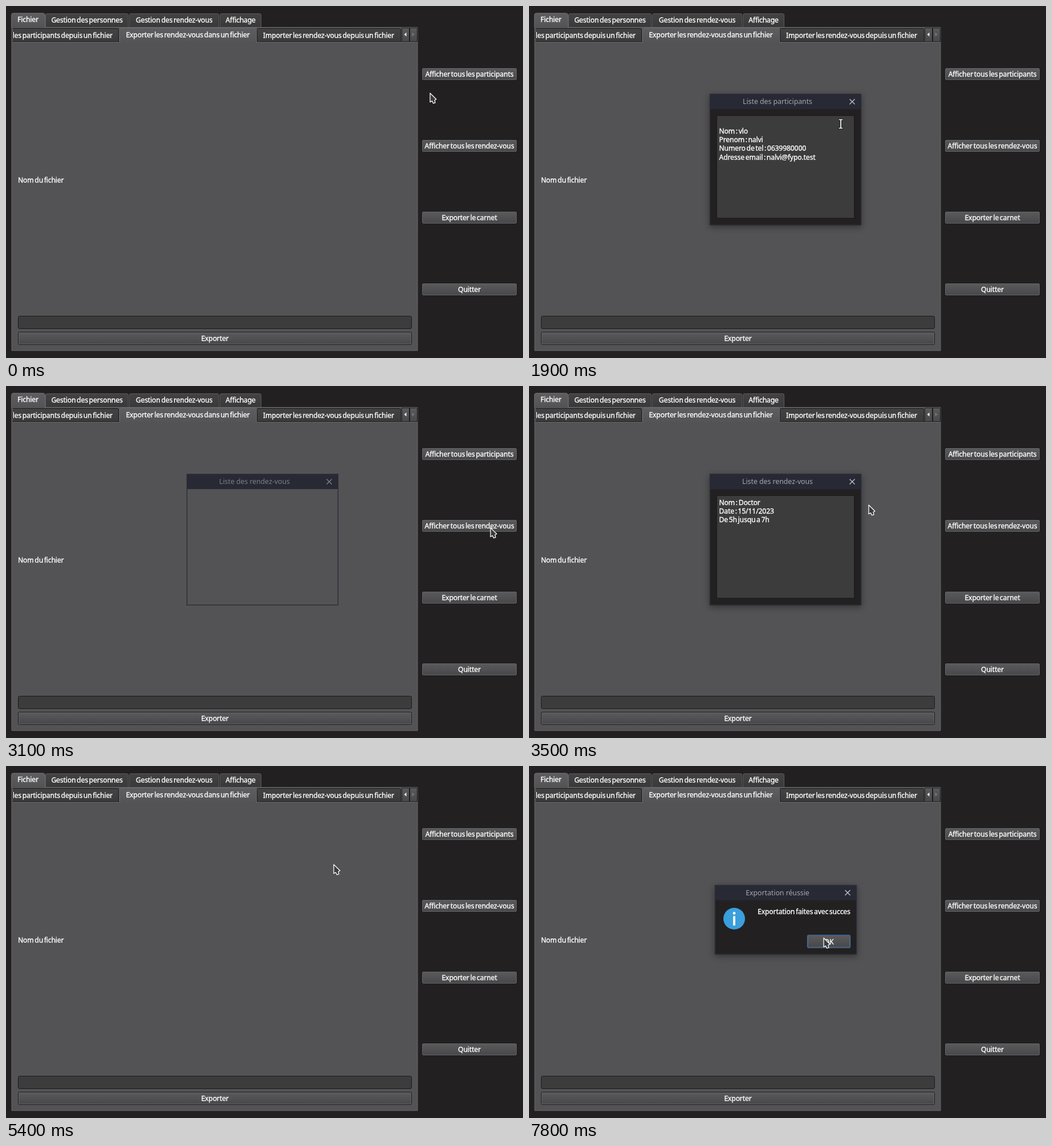
An HTML page that plays this animation: 907x618 px, repeating every 8000 ms.

```html
<!DOCTYPE html>
<html lang="fr">
<head>
<meta charset="utf-8">
<title>Carnet de rendez-vous</title>
<style>
html, body { margin: 0; width: 100%; height: 100%; overflow: hidden; background: #222021; }
svg { display: block; width: 907px; height: 618px; }
text { font: 12.2px "Noto Sans", "Open Sans", sans-serif; letter-spacing: -.15px; word-spacing: -1.3px; fill: #fff; stroke: #fff; stroke-width: .35px; white-space: pre; }
.mid { text-anchor: middle; }
.end { text-anchor: end; }
.title { font-size: 12.27px; letter-spacing: 0; word-spacing: 0; fill: #a6a8ad; stroke: none; text-anchor: middle; }
.opening .title { fill: #7d7f85; }
.opening .cross { stroke: #85878c; }
.opening .content { display: none; }
.dialog { filter: drop-shadow(0 3px 6px rgba(0, 0, 0, .38)); }
.dialog.opening { filter: none; }
.cross { stroke: #c9cbd0; stroke-width: 1.2; fill: none; }
.hot { fill: #e07076; visibility: hidden; }
.hover .hot { visibility: visible; }
.hover .cross { stroke: #fff; }
.field { fill: #3c3c3c; stroke: #1b1a1b; }
.edge { fill: none; stroke: #1b1a1b; }
.face { fill: url(#raised); stroke: #646466; }
.focus .edge { stroke: #3f6c9c; stroke-width: 1.3; }
.pressed .face { fill: #434345; }
.frame { fill: none; stroke: #2b2d39; stroke-width: 1.4; }
</style>
</head>
<body>
<svg viewBox="0 0 907 618">
  <defs>
    <linearGradient id="raised" x2="0" y2="1"><stop stop-color="#5a5a5c"/><stop offset="1" stop-color="#48484a"/></linearGradient>
    <linearGradient id="idle" x2="0" y2="1"><stop stop-color="#434344"/><stop offset="1" stop-color="#39393a"/></linearGradient>
    <linearGradient id="active" x2="0" y2="1"><stop stop-color="#5e5e60"/><stop offset="1" stop-color="#535355"/></linearGradient>
    <clipPath id="tabClip"><path d="M12 38H694V64H12Z"/></clipPath>
  </defs>
  <rect width="907" height="618" fill="#222021"/>

  <g id="topTabs"></g>
  <path d="M10 37.5H722V605H10Z" fill="#535355" stroke="#69696b"/>
  <path d="M9.5 38V16Q9.5 12.5 13 12.5H64.5Q68.5 12.5 68.5 16V38" fill="url(#active)" stroke="#69696b"/>
  <text class="mid" x="38.5" y="28.3">Fichier</text>

  <path d="M12 46V57" stroke="#111" stroke-width="2"/>
  <g clip-path="url(#tabClip)" id="subTabs"></g>
  <path d="M11 62.5H199M440 62.5H721" stroke="#1e1d1e"/>
  <path d="M11 63.5H199M440 63.5H721" stroke="#69696b"/>
  <path d="M694.5 38.5h13v24h-13zM708.5 38.5h13v24h-13z" stroke="#1e1d1e" fill="url(#raised)"/>
  <path d="M702.5 46.5v7l-4-3.5z" fill="#eee"/>
  <path d="M712.5 46.5v7l4-3.5z" fill="#77777a"/>

  <text x="21" y="309.8">Nom du fichier</text>
  <rect class="field" x="21.5" y="544.5" width="690" height="22" rx="2"/>
  <g id="buttons"></g>
  <g id="dialogs"></g>

  <path id="arrow" d="M1 1V16.8L4.400 14.700 6.600 18.900 10 17.900 9 13.400 11.900 11.800Z" fill="#3b3b3c" stroke="#fff" stroke-width="1.25" stroke-linejoin="round"/>
  <g id="beam" fill="none" stroke-linecap="square">
    <path d="M-2.500-7.500h5m-5 15h5M0-7.500v15" stroke="#1a1a1a" stroke-width="3.4"/>
    <path d="M-2.500-7.500h5m-5 15h5M0-7.500v15" stroke="#fff" stroke-width="1.7"/>
  </g>
</svg>
<script>
const $ = id => document.getElementById(id);
const label = (x, y, s, cls = '') => `<text class="${cls}" x="${x}" y="${y}">${s}</text>`;
const button = (x, y, w, s, cls = '') => `<g class="${cls}">
  <rect class="face" x="${x + 1}" y="${y + 1}" width="${w - 2}" height="20" rx="1.5"/>
  <rect class="edge" x="${x}" y="${y}" width="${w}" height="22" rx="2"/>
  ${label(x + w / 2, y + 15.8, s, 'mid')}</g>`;
const tab = (x, y, w, h, fill, line) =>
  `<path d="M${x}.5 ${y + h}v${2.5 - h}q0-2.5 2.5-2.5h${w - 5}q2.5 0 2.5 2.5v${h - 2.5}" fill="url(#${fill})" stroke="${line}"/>`;

const topTab = (x, w, s) => tab(x, 13.5, w, 23.5, 'idle', '#5a5a5c') + label(x + w / 2 + .5, 29, s, 'mid');
$('topTabs').innerHTML = topTab(69, 145, 'Gestion des personnes') +
  topTab(216, 157, 'Gestion des rendez-vous') + topTab(375, 72, 'Affichage');

$('subTabs').innerHTML = tab(-60, 39.5, 258, 26, 'idle', '#1e1d1e') + tab(440, 39.5, 252, 26, 'idle', '#1e1d1e') +
  tab(199, 38.5, 240, 27, 'active', '#69696b') +
  label(187, 55.5, 'Importer les participants depuis un fichier', 'end') +
  label(319, 55, 'Exporter les rendez-vous dans un fichier', 'mid') +
  label(566, 55.5, 'Importer les rendez-vous depuis un fichier', 'mid');

$('buttons').innerHTML = ['Afficher tous les participants', 'Afficher tous les rendez-vous', 'Exporter le carnet', 'Quitter']
  .map((s, i) => button(729.5, 108.5 + i * 126, 167, s)).join('') + button(21.5, 572.5, 690, 'Exporter');

const dialog = (x, y, w, h, title, content) => `<g class="dialog">
  <rect class="content" x="${x}" y="${y}" width="${w}" height="${h}" fill="#222021"/>
  <rect x="${x}" y="${y}" width="${w}" height="26.5" fill="#272a34"/>
  <rect class="frame" x="${x + .5}" y="${y + .5}" width="${w - 1}" height="${h - 1}"/>
  ${label(436, y + 17.8, title, 'title')}
  <circle class="hot" cx="${x + w - 16}" cy="${y + 13.5}" r="11"/>
  <path class="cross" d="M${x + w - 20.5} ${y + 9}l9 9m0-9l-9 9"/>
  <g class="content">${content}</g></g>`;
const listDialog = (title, lines) => dialog(317, 154.5, 266, 230.5, title,
  '<rect class="field" x="329.5" y="192.5" width="241" height="180"/>' +
  lines.map((s, i) => label(333.5, 208.5 + i * 15.25, s)).join(''));

$('dialogs').innerHTML =
  listDialog('Liste des participants',
    ['', 'Nom : vlo', 'Prenom : nalvi', 'Numero de tel : 0639980000', 'Adresse email : nalvi@fypo.test']) +
  listDialog('Liste des rendez-vous', ['Nom : Doctor', 'Date : 15/11/2023', 'De 5h jusqu a 7h']) +
  dialog(326, 209, 249, 122, 'Exportation réussie',
    `<circle cx="360" cy="268" r="19" fill="#3a9fdb"/>
    <circle cx="360" cy="258.5" r="2.4" fill="#fff"/><path d="M360 263.5V280" stroke="#fff" stroke-width="3.8"/>` +
    label(401, 259.7, 'Exportation faites avec succes') + button(488.5, 297, 75, 'OK', 'focus'));

// Pointer moves: start, end, x, y
const moves = [
  [0, 0, 743, 152], [0, 400, 814, 121], [1100, 1500, 575, 217], [1500, 1900, 547, 207],
  [1900, 2100, 569, 171], [2300, 2800, 849, 248], [3200, 3600, 548, 200], [3600, 3900, 574, 172],
  [5600, 6200, 895, 398], [6200, 6500, 803, 370], [6800, 7300, 514, 258], [7400, 7800, 516, 301]];
// Each dialog's opening and closing time
const spans = [[600, 2400], [3100, 5400], [6600, 8000]];
const STEP = 100;
const boxes = [...$('dialogs').children], buttons = [...$('buttons').children];
const ease = k => k * k * (3 - 2 * k);
const show = (el, on) => el.style.display = on ? '' : 'none';

function pointer(t) {
  let x = 0, y = 0;
  for (const [start, end, toX, toY] of moves) {
    if (t < start) break;
    const k = t >= end ? 1 : ease((t - start) / (end - start));
    x += (toX - x) * k;
    y += (toY - y) * k;
  }
  return [Math.round(x), Math.round(y)];
}

function draw(now) {
  const t = Math.floor(now % 8000 / STEP) * STEP;
  const [x, y] = pointer(t);
  let beam = false;
  spans.forEach(([start, end], i) => {
    const box = boxes[i], isList = i < 2, open = t >= start && t < end;
    show(box, open);
    box.style.opacity = isList && t >= end - STEP ? .5 : 1;
    box.classList.toggle('opening', isList && t < start + STEP);
    box.classList.toggle('hover', isList && Math.hypot(x - 567, y - 168) < 11);
    buttons[i].classList.toggle('pressed', t < start && t >= start - 2 * STEP);
    if (isList && open && x > 330 && x < 571 && y > 192) beam = true;
  });
  show($('arrow'), !beam);
  show($('beam'), beam);
  for (const id of ['arrow', 'beam']) $(id).setAttribute('transform', `translate(${x} ${y})`);
}

const begin = performance.now();
function tick() {
  draw(performance.now() - begin);
  requestAnimationFrame(tick);
}
tick();
</script>
</body>
</html>
```
